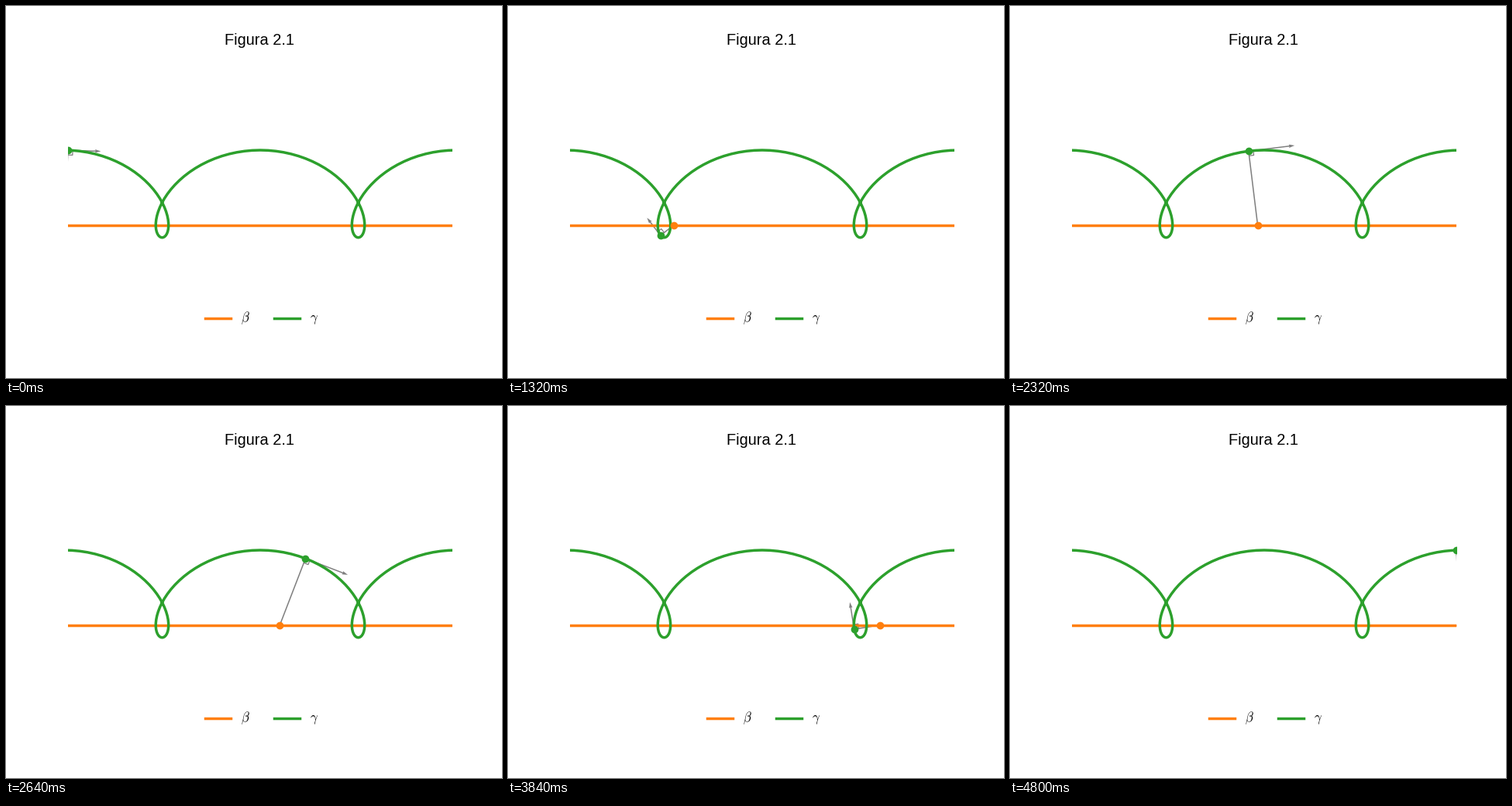
Recreate the animation shown at these times as a matplotlib script. Size 640 px wide and 480 px high, loop 4.84 s.

```python
import numpy as np
import matplotlib.pyplot as plt
from matplotlib.animation import FuncAnimation
from matplotlib.lines import Line2D

W, H, DPI = 640, 480, 100
FRAMES, INTERVAL = 121, 40
ARM = 1.4        # distance of the tracing point from the wheel centre, wheel radius 1
CORNER = 0.15    # side of the right-angle sign
ORANGE, GREEN, GRAY = "tab:orange", "tab:green", "tab:gray"

plt.rcParams["mathtext.fontset"] = "cm"

# Contact point (beta) and trochoid (gamma); the end samples sit half a step inside.
theta = np.linspace(-2 * np.pi, 2 * np.pi, FRAMES)
beta = np.column_stack([theta, np.zeros(FRAMES)])
gamma = np.column_stack([theta + ARM * np.sin(theta), 1 + ARM * np.cos(theta)])
gamma[0] = (gamma[0] + gamma[1]) / 2
gamma[-1] = (gamma[-1] + gamma[-2]) / 2

step = np.gradient(gamma, axis=0)
speed = np.linalg.norm(step, axis=1, keepdims=True)
tangent = step / speed
normal = np.column_stack([tangent[:, 1], -tangent[:, 0]])
arrow = 2.97 * np.sqrt(speed) * tangent

fig = plt.figure(figsize=(W / DPI, H / DPI), dpi=DPI, facecolor="white")
ax = fig.add_axes([0.125, 0.11, 0.775, 0.77])
ax.axis("off")
half_w = gamma[-1, 0]
half_h = half_w * (0.77 * H) / (0.775 * W)
ax.set_xlim(-half_w, half_w)
ax.set_ylim(1 - half_h, 1 + half_h)

ax.plot(beta[[0, -1], 0], beta[[0, -1], 1], color=ORANGE, lw=2.5)
ax.plot(gamma[:, 0], gamma[:, 1], color=GREEN, lw=2.5)

link, = ax.plot([], [], color=GRAY, lw=1.1, zorder=1.5)
corner, = ax.plot([], [], color=GRAY, lw=0.9, zorder=1.5)
velocity = ax.quiver(0, 0, 1, 0, color=GRAY, width=0.003, angles="uv",
                     scale_units="x", scale=1, zorder=1)
beta_dot, = ax.plot([], [], "o", color=ORANGE, ms=6, zorder=3)
gamma_dot, = ax.plot([], [], "o", color=GREEN, ms=6, zorder=3)


def label(x, y, text, **style):
    fig.text(x / W, 1 - y / H, text, color="black", ha="left", va="baseline", **style)


def legend_entry(x, color, text):
    y = 1 - 403.3 / H
    fig.add_artist(Line2D([x / W, (x + 33) / W], [y, y], color=color, lw=2.5))
    label(x + 46, 407.6, text, fontsize=12)


label(281.5, 50, "Figura 2.1", fontsize=14.4, family="Liberation Sans")
legend_entry(256.7, ORANGE, r"$\beta$")
legend_entry(345.7, GREEN, r"$\gamma$")


def draw(i):
    b, g = beta[i], gamma[i]
    t, n = CORNER * tangent[i], CORNER * normal[i]
    link.set_data(*np.array([b, g]).T)
    corner.set_data(*np.array([g + t, g + t + n, g + n]).T)
    velocity.set_offsets([g])
    velocity.set_UVC(*arrow[i])
    beta_dot.set_data([b[0]], [b[1]])
    gamma_dot.set_data([g[0]], [g[1]])
    return link, corner, velocity, beta_dot, gamma_dot


anim = FuncAnimation(fig, draw, frames=FRAMES, interval=INTERVAL,
                     repeat=True, repeat_delay=0)
plt.show()
```
